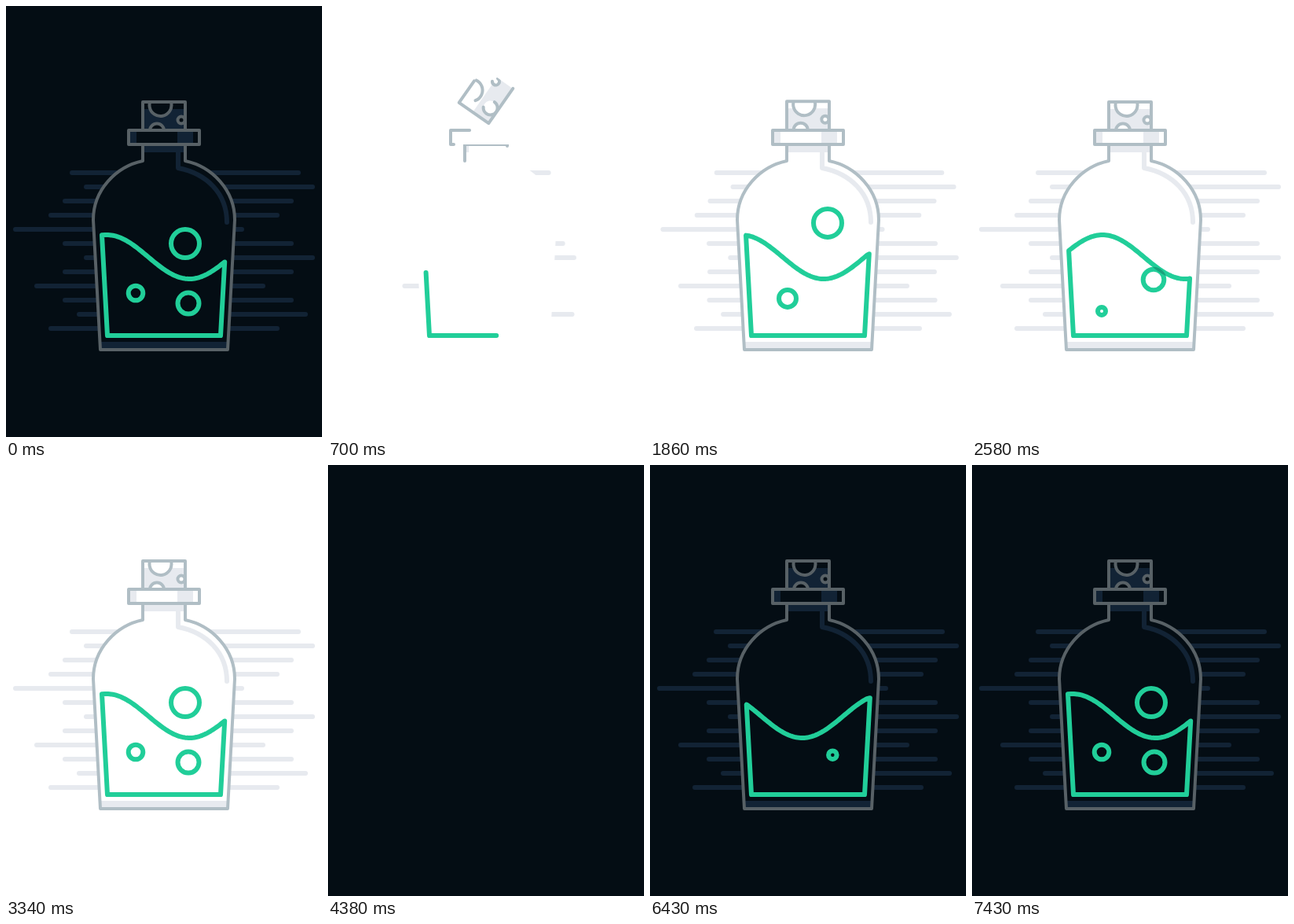
An HTML page with a canvas for the animation above (8140 ms loop, 402 px wide and 548 px high).

```html
<!DOCTYPE html>
<html lang="en">
<head>
<meta charset="utf-8">
<title>Potion bottle</title>
<style>
  html, body { margin: 0; width: 100%; height: 100%; overflow: hidden; }
  canvas { display: block; width: 402px; height: 548px; }
</style>
</head>
<body>
<canvas id="stage"></canvas>
<script>
const W = 402, H = 548, LOOP = 8140, END = 2800, STEP = 40;
const GREEN = '#21ce99', OVERLAP = '#18a27b';
const THEMES = {
  light: { bg: '#ffffff', line: '#b0bec5', shade: '#e7eaef' },
  dark: { bg: '#040d14', line: '#586166', shade: '#122335' }
};

const dpr = window.devicePixelRatio || 1;
function setup(canvas) {
  canvas.width = W * dpr;
  canvas.height = H * dpr;
  const c = canvas.getContext('2d');
  c.scale(dpr, dpr);
  c.lineCap = c.lineJoin = 'round';
  return c;
}
const ctx = setup(document.getElementById('stage'));
const layer = setup(document.createElement('canvas'));

const clamp = v => Math.max(0, Math.min(1, v));
const cubicOut = s => 1 - (1 - clamp(s)) ** 3;
const smooth = s => { s = clamp(s); return s * s * (3 - 2 * s); };

const bottle = new Path2D('M174 197V176H228V197C262 204 291 234 291 272L282 437H120L111 272C111 234 140 204 174 197Z');
const band = new Path2D('M160 176H156V158H246V176Z');
const gloss = new Path2D('M219 182V206C255 213 281 238 281 275');
const cork = new Path2D('M27 23H-27V-23H27Z');

// Centres of the speed lines by height; ranks give the order in which they grow.
const lines = [228, 246, 219, 201, 156, 219, 246, 219, 183, 219, 237, 201];
const ranks = [5, 10, 7, 9, 11, 1, 3, 6, 0, 4, 2, 8];

// x, drift, y at birth, rise speed, radius, birth, growth time, death
const bubbles = [
  { x: 226, dx: 0, y: 405, v: .25, r: 18, born: 726, grow: 345, dies: 1510 },
  { x: 175, dx: 0, y: 396.3, v: .076, r: 11, born: 922, grow: 320, dies: 1560 },
  { x: 233.2, dx: -.0087, y: 382.2, v: .134, r: 18, born: 1505, grow: 345, dies: 9999 },
  { x: 165, dx: 0, y: 396, v: .067, r: 9.3, born: 1640, grow: 223, dies: 9999 },
  { x: 232, dx: 0, y: 395.4, v: .067, r: 13.5, born: 1844, grow: 259, dies: 9999 }
];

// Strokes the first part p of a path of the given length.
function trim(path, length, p, width, color) {
  if (p <= 0) return;
  ctx.setLineDash(p < 1 ? [length * p, 9999] : []);
  ctx.lineWidth = width;
  ctx.strokeStyle = color;
  ctx.stroke(path);
  ctx.setLineDash([]);
}

function box(x, y, w, h, color) {
  ctx.fillStyle = color;
  ctx.fillRect(x, y, w, h);
}

function drawLines(u, c) {
  ctx.strokeStyle = c.shade;
  ctx.lineWidth = 6;
  lines.forEach((x, i) => {
    const half = 147 * cubicOut((u + 289 - 40 * ranks[i]) / 1698) - 3;
    if (half <= 0) return;
    const y = 212 + 18 * i;
    ctx.beginPath();
    ctx.moveTo(x - half, y);
    ctx.lineTo(x + half, y);
    ctx.stroke();
  });
}

function drawGlass(p, c) {
  const late = clamp(2 * p - 1);
  ctx.fillStyle = c.bg;
  ctx.fill(bottle);
  ctx.save();
  ctx.clip(bottle);
  box(174, 176, 54 * p, 10, c.shade);
  box(118, 427, 166 * late, 10, c.shade);
  ctx.restore();
  trim(gloss, 121, late, 6, c.shade);
  trim(bottle, 795, p, 4, c.line);
}

function drawHole(x, y, r, from, sweep, p, c) {
  ctx.beginPath();
  ctx.arc(x, y, r, 0, 2 * Math.PI);
  ctx.fillStyle = c.bg;
  ctx.fill();
  if (p <= 0) return;
  ctx.beginPath();
  ctx.arc(x, y, r, from, from + sweep * p);
  ctx.strokeStyle = c.line;
  ctx.lineWidth = 4;
  ctx.stroke();
}

function drawCork(u, c) {
  const p = cubicOut(u / 520), left = clamp(1 - u / 800);
  const drop = 1 - smooth((u - 850) / 590);
  const shift = -3 * drop * clamp(u / 1000);
  ctx.save();
  ctx.translate(201, 145 - 8 * drop - 33 * left ** 1.6);
  ctx.rotate(-86 * left ** 2 * Math.PI / 180);
  ctx.fillStyle = c.bg;
  ctx.fill(cork);
  ctx.save();
  ctx.clip(cork);
  box(-27, 23 - 37 * p, 54, 37 * p, c.shade);
  drawHole(-4.5 + shift, -19, 14, -.2, 3.55, p, c);
  drawHole(-9 + shift, 13.5, 9, 0, 2 * Math.PI, p, c);
  drawHole(22 + shift / 2, 0, 4.5, 0, 2 * Math.PI, p, c);
  ctx.restore();
  trim(cork, 200, p, 4, c.line);
  ctx.restore();
}

function drawBand(u, c) {
  const p = cubicOut((u - 120) / 520), late = clamp(2 * p - 1);
  ctx.fillStyle = c.bg;
  ctx.fill(band);
  box(156, 158, 10 * late, 18, c.shade);
  box(218, 158, 20 * late, 18, c.shade);
  trim(band, 216, p, 4, c.line);
}

function liquidPath(w) {
  const crest = 122 + w * .5023;
  const level = x => 319 - 28 * Math.cos(2 * Math.PI * (x - crest) / 210);
  const y0 = level(123), y1 = level(278);
  const x0 = 129 - (419 - y0) * .0547, x1 = 273 + (419 - y1) * .0556;
  const path = new Path2D();
  path.moveTo(x0, y0);
  path.lineTo(129, 419);
  path.lineTo(273, 419);
  path.lineTo(x1, y1);
  for (let x = 276; x > 124; x -= 2) path.lineTo(x, level(x));
  path.closePath();
  return path;
}

function drawBubbles(w, liquid) {
  layer.clearRect(0, 0, W, H);
  layer.lineWidth = 6;
  layer.strokeStyle = GREEN;
  for (const b of bubbles) {
    const age = w - b.born;
    const r = b.r * Math.min(1, age / b.grow, (b.dies - w) / 200);
    if (r <= 0) continue;
    layer.beginPath();
    layer.arc(b.x + b.dx * age, b.y - b.v * age, r, 0, 2 * Math.PI);
    layer.stroke();
  }
  // Darken the rings where they cross the surface.
  layer.globalCompositeOperation = 'source-atop';
  layer.strokeStyle = OVERLAP;
  layer.stroke(liquid);
  layer.globalCompositeOperation = 'source-over';
  ctx.drawImage(layer.canvas, 0, 0, W, H);
}

function render(t) {
  const dark = t < 330 || t >= 4380;
  const c = dark ? THEMES.dark : THEMES.light;
  document.body.style.background = c.bg;
  box(0, 0, W, H, c.bg);

  let u = t < 330 ? END : t - (dark ? 4630 : 540);
  if (u < 0) return;
  u = Math.min(END, Math.floor(u / STEP) * STEP);
  const w = 2200 * Math.sin(u / 2200);

  drawLines(u, c);
  drawGlass(cubicOut((u - 138) / 660), c);
  drawCork(u, c);
  drawBand(u, c);
  const liquid = liquidPath(w);
  trim(liquid, 555, cubicOut((u - 80) / 720), 6, GREEN);
  drawBubbles(w, liquid);
}

const start = performance.now();
function tick() {
  render((performance.now() - start) % LOOP);
  requestAnimationFrame(tick);
}
tick();
</script>
</body>
</html>
```
